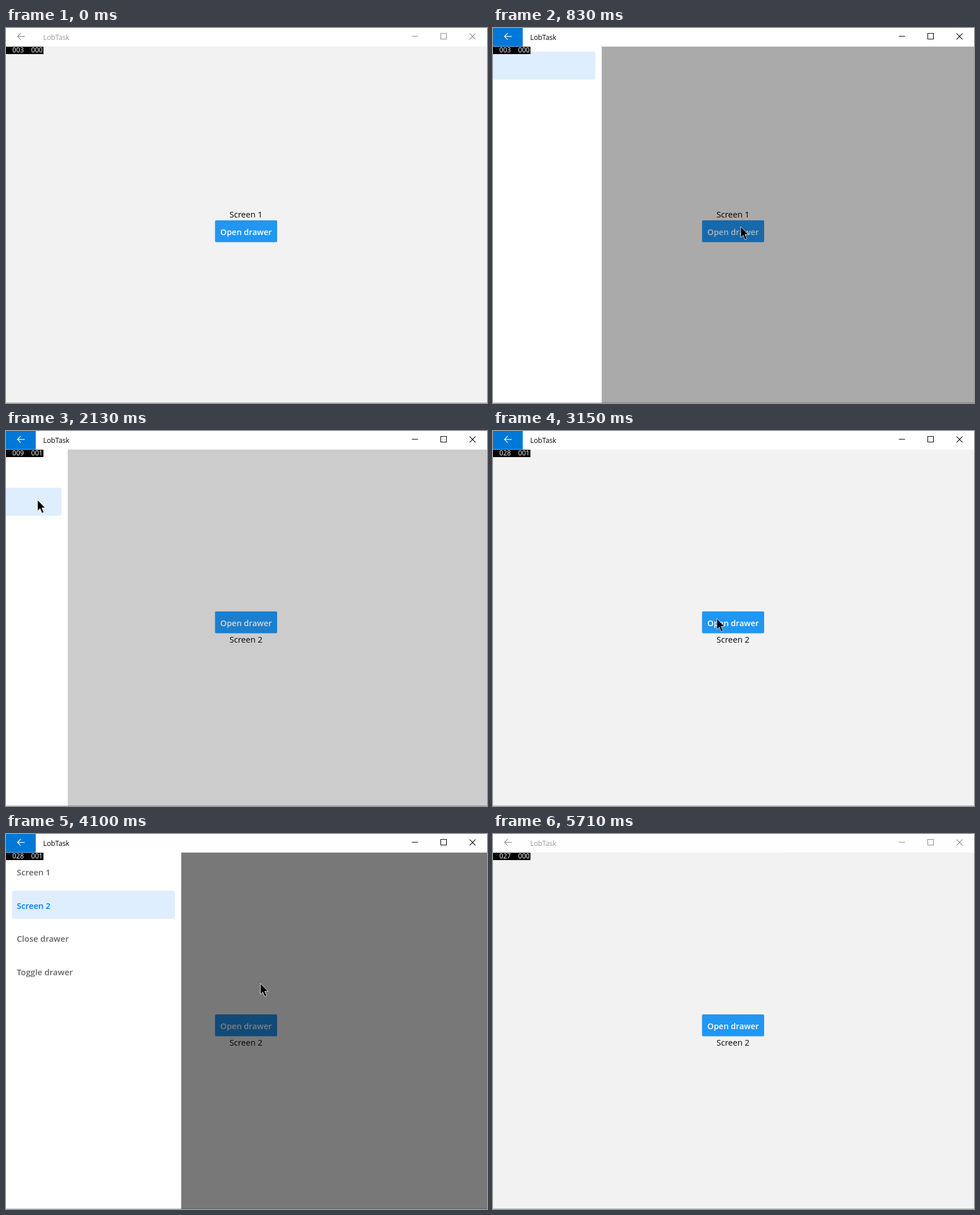
An HTML page that plays this animation: 848x661 px, repeating every 5780 ms.

```html
<!DOCTYPE html>
<html lang="en">
<head>
<meta charset="utf-8">
<title>Drawer</title>
<style>
  html, body { margin: 0; width: 100%; height: 100%; overflow: hidden; background: #f2f2f2; }
  svg { display: block; width: 100vw; height: 100vh; }
  text { font-family: "Open Sans", "Noto Sans", sans-serif; white-space: pre; }
  .label { font-size: 14.6px; text-anchor: middle; }
  .button { fill: #2196f3; }
  .caption { font-size: 14.4px; font-weight: 600; fill: #fff; text-anchor: middle; }
  .item { font-size: 14.6px; font-weight: 600; fill: #656566; }
  .item.active { fill: #007aff; }
  .counter { font-size: 11.7px; fill: #fff; }
  .title { font-size: 12.3px; }
  .icon { fill: none; stroke: #000; stroke-width: 1.1; }
  .back { stroke: #fff; stroke-width: 1.2; }
  .idle .title { fill: #999; }
  .idle .icon { stroke: #8a8a8a; }
  .idle .backdrop { display: none; }
</style>
</head>
<body>
<svg viewBox="0 0 848 661">
  <rect width="848" height="661" fill="#f2f2f2"/>

  <g id="screen1">
    <text class="label" x="423" y="334">Screen 1</text>
    <rect class="button" x="368.5" y="339" width="109.5" height="38.5" rx="2"/>
    <text class="caption" x="423.3" y="365">Open drawer</text>
  </g>
  <g id="screen2">
    <rect class="button" x="368.5" y="318" width="109.5" height="38.5" rx="2"/>
    <text class="caption" x="423.3" y="344">Open drawer</text>
    <text class="label" x="423" y="373">Screen 2</text>
  </g>

  <rect id="scrim" y="32.5" width="848" height="628.5"/>

  <g id="drawer">
    <rect y="32" width="309" height="629" fill="#fff"/>
    <rect id="highlight" x="10.5" y="41.5" width="287.5" height="49.5" rx="4" fill="#dfeeff"/>
    <text class="item" x="19" y="73">Screen 1</text>
    <text class="item" x="19" y="131.6">Screen 2</text>
    <text class="item" x="19" y="190.2">Close drawer</text>
    <text class="item" x="19" y="248.8">Toggle drawer</text>
  </g>

  <rect y="660" width="848" height="1" opacity=".25"/>

  <g id="titlebar">
    <rect width="848" height="32.5" fill="#fff"/>
    <rect class="backdrop" width="52.5" height="32.5" fill="#0078d7"/>
    <path class="icon back" d="M33 14.8H20.3M26 9L20.2 14.8L26 20.6"/>
    <text class="title" x="65.5" y="20.5">LobTask</text>
    <path class="icon" d="M715.5 14.5H726.5M766.5 9.5H776.5V19.5H766.5ZM817.3 9.7L827.7 20.1M827.7 9.7L817.3 20.1"/>
  </g>

  <rect y="33" width="66" height="13"/>
  <text class="counter" id="counterA" x="11.3" y="43">003</text>
  <text class="counter" id="counterB" x="44.5" y="43">000</text>

  <path id="cursor" d="M0 0V19.4L4.3 15.3L7.7 23.2L11 21.8L7.6 14H13.4Z"
        stroke="#fff" stroke-width=".8"/>
</svg>

<script>
  const LOOP = 5780;
  const DRAWER = 309;
  const OMEGA = Math.sqrt(1000 / 3);

  const $ = id => document.getElementById(id);
  const items = document.querySelectorAll('.item');
  const show = (el, on) => el.style.display = on ? '' : 'none';

  const easeIn = k => k * k;
  const easeOut = k => 1 - (1 - k) ** 2;
  const easeInOut = k => k * k * (3 - 2 * k);

  // Critically damped spring, from 0 to 1
  const spring = ms => {
    const u = OMEGA * Math.max(0, ms) / 1000;
    return 1 - (1 + u) * Math.exp(-u);
  };

  // [start, end, x, y, easing]
  const moves = [
    [70, 600, 436.7, 350, easeOut],
    [1130, 1220, 418, 352, easeInOut],
    [1240, 1470, 318, 290, easeIn],
    [1470, 1800, 55.7, 121.5, easeOut],
    [2440, 3030, 394.7, 330.5, easeInOut],
    [3710, 4240, 459.5, 249.5, easeInOut],
    [4900, 5420, 772, 663, easeIn]
  ];

  function cursorAt(t) {
    let x = 745, y = 663;
    for (const [start, end, toX, toY, ease] of moves) {
      if (t < start) break;
      const k = ease(Math.min(1, (t - start) / (end - start)));
      x += (toX - x) * k;
      y += (toY - y) * k;
    }
    return [x, y];
  }

  function drawerEdge(t) {
    const open = t < 2010 ? spring(t - 716)
      : t < 3309 ? 1 - spring(t - 2010)
      : t < 4400 ? spring(t - 3309)
      : 1 - spring(t - 4400);
    const edge = DRAWER * open;
    return edge < 0.4 ? 0 : edge > DRAWER - 0.4 ? DRAWER : edge;
  }

  function render(t) {
    const second = t >= 1930;
    show($('screen1'), !second);
    show($('screen2'), second);
    $('highlight').setAttribute('y', second ? 100 : 41.5);
    items[0].classList.toggle('active', !second);
    items[1].classList.toggle('active', second);

    const edge = drawerEdge(t);
    $('drawer').setAttribute('transform', `translate(${edge - DRAWER})`);
    $('scrim').setAttribute('opacity', 0.5 * Math.max(0, (edge - 16) / (DRAWER - 16)));

    $('titlebar').setAttribute('class', t < 590 || t >= 5710 ? 'idle' : '');
    $('counterA').textContent = t < 1000 ? '003' : t < 2900 ? '009' : t < 5100 ? '028' : '027';
    $('counterB').textContent = t < 1300 || t >= 5100 ? '000' : '001';
    $('cursor').setAttribute('transform', `translate(${cursorAt(t)})`);
  }

  const origin = performance.now();
  function tick() {
    render((performance.now() - origin) % LOOP);
    requestAnimationFrame(tick);
  }
  tick();
</script>
</body>
</html>
```
